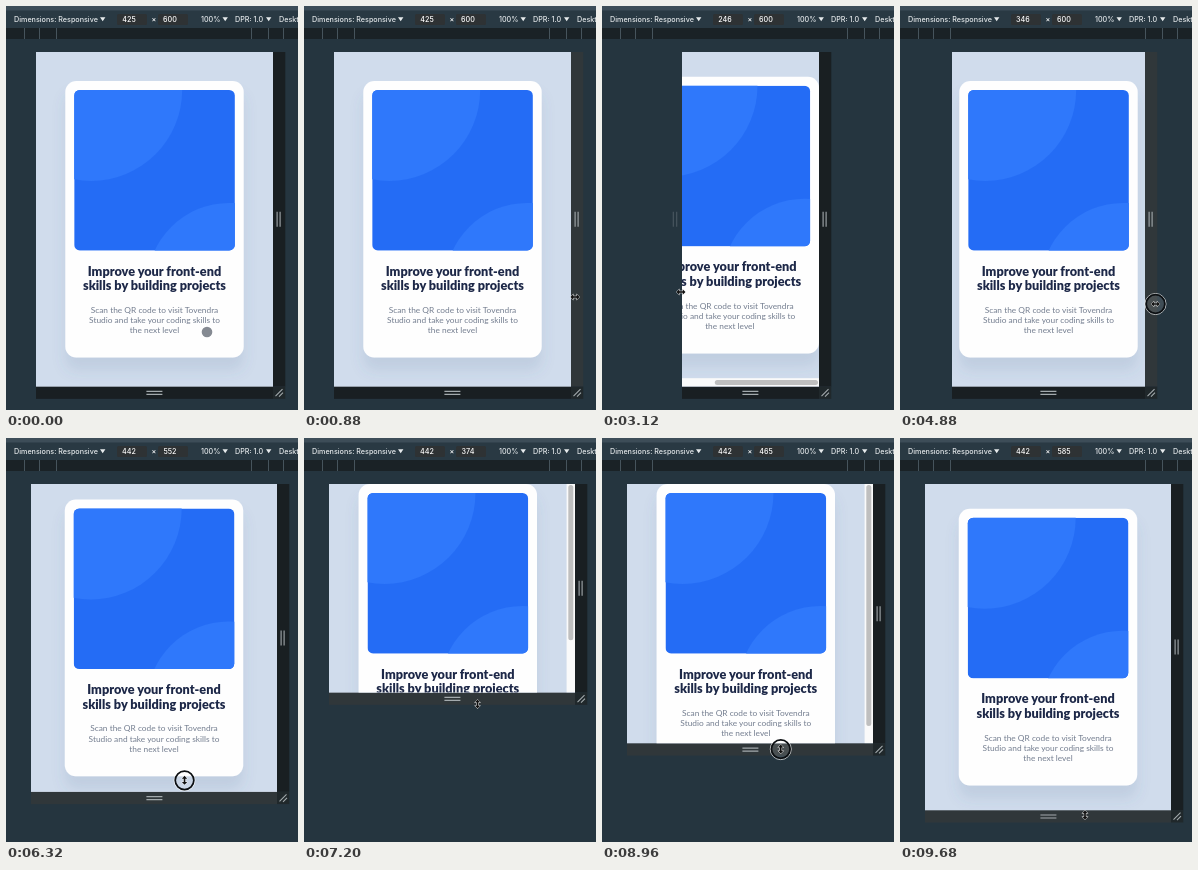
Recreate the animation shown at these times as an HTML page. Size 292 px wide and 404 px high, loop 9.76 s.

```html
<!DOCTYPE html>
<html lang="en">
<head>
<meta charset="utf-8">
<title>Responsive card preview</title>
<style>
  html, body { margin: 0; width: 100%; height: 100%; overflow: hidden; background: #25353f; }
  svg { display: block; }
  .bar { font: 500 7.2px Inter, sans-serif; fill: #e6eaec; }
  .field { text-anchor: middle; fill: #fff; }
  .title { font: 900 12.7px Lato, sans-serif; fill: #1d2848; text-anchor: middle; }
  .body { font: 400 8.35px Lato, sans-serif; fill: #737d8f; text-anchor: middle; }
  .grip { stroke: #a3aaad; stroke-width: 1.1; fill: none; }
  .icon { fill: #111; stroke: #fff; stroke-width: .9; paint-order: stroke; stroke-linejoin: round; }
</style>
</head>
<body>
<svg width="292" height="404" viewBox="0 0 292 404">
  <defs>
    <clipPath id="panel"><rect width="160.6" height="160.6" rx="5.6"/></clipPath>
    <filter id="shade" x="-20%" y="-20%" width="140%" height="140%">
      <feDropShadow dx="0" dy="13" stdDeviation="7" flood-color="#40608c" flood-opacity=".12"/>
    </filter>
  </defs>
  <rect width="292" height="404" fill="#25353f"/>

  <!-- toolbar -->
  <rect width="292" height="22" fill="#293943"/>
  <rect width="292" height="4.5" fill="#3d4d58"/>
  <rect x="111" y="8" width="30" height="11" rx="1.5" fill="#2e3234"/>
  <rect x="152" y="8" width="30" height="11" rx="1.5" fill="#2e3234"/>
  <g class="bar">
    <text x="8" y="15.8">Dimensions: Responsive</text>
    <text id="wText" class="field" x="123" y="15.8">425</text>
    <text class="field" x="148" y="16">×</text>
    <text id="hText" class="field" x="164" y="15.8">600</text>
    <text x="195" y="15.8">100%</text>
    <text x="229" y="15.8">DPR: 1.0</text>
    <text x="273" y="15.8">Desktop</text>
    <path d="M94 11.3h5.4l-2.7 4zM216.5 11.3h5.4l-2.7 4zM260 11.3h5.4l-2.7 4z"/>
  </g>
  <rect y="22" width="292" height="11" fill="#1a2226"/>
  <path d="M18.5 22v11M33.5 22v11M50.5 22v11M245.5 22v11M262.5 22v11M277.5 22v11" stroke="#46545c"/>

  <!-- resize handles -->
  <rect id="rightBar" y="46" width="12.3"/>
  <rect id="bottomBar" height="12.3"/>
  <rect id="corner" width="12.3" height="12.3" fill="#20282b"/>
  <path id="leftGrip" class="grip" d="M-1.7-7.5v15M1.7-7.5v15" opacity=".3"/>
  <path id="rightGrip" class="grip" d="M-1.5-7.5v15M1.5-7.5v15"/>
  <path id="bottomGrip" class="grip" d="M-8-1.5h16M-8 1.5h16"/>
  <path id="cornerGrip" class="grip" d="M2.5 9.5l7-7M6 10l4-4"/>

  <!-- page -->
  <svg id="view" y="46">
    <rect width="100%" height="100%" fill="#faf7fb"/>
    <rect id="sky" width="100%" height="700" fill="#d0dcec"/>
    <g id="card">
      <rect width="178.4" height="276.6" rx="11" fill="#fefefe" filter="url(#shade)"/>
      <g transform="translate(8.9 8.9)" clip-path="url(#panel)">
        <rect width="161" height="161" fill="#246cf5"/>
        <circle cx="17" r="91" fill="#2f78fb"/>
        <circle cx="155" cy="195" r="82" fill="#2f78fb"/>
      </g>
      <g class="title">
        <text x="89.2" y="194.7">Improve your front-end</text>
        <text x="89.2" y="209.2">skills by building projects</text>
      </g>
      <g class="body">
        <text x="89.2" y="231.8">Scan the QR code to visit Tovendra</text>
        <text x="89.2" y="242">Studio and take your coding skills to</text>
        <text x="89.2" y="252.2">the next level</text>
      </g>
    </g>
    <g id="hScroll">
      <rect id="hTrack" width="100%" height="8.4" fill="#fafafa"/>
      <rect id="hThumb" height="5" rx="2.5" fill="#bfbfbf"/>
    </g>
    <g id="vScroll">
      <rect id="vTrack" width="8.4" height="100%" fill="#fafafa"/>
      <rect id="vThumb" width="5" rx="2.5" fill="#bfbfbf"/>
    </g>
  </svg>

  <!-- pointer -->
  <g id="pointer">
    <circle id="dot" r="5.3" fill="#858a92"/>
    <g id="ring" fill="none">
      <circle r="10.5" stroke="#fff" stroke-opacity=".8" stroke-width=".9"/>
      <circle r="9.3" fill="#fff" fill-opacity=".12" stroke="#0c0f12" stroke-width="1.7"/>
    </g>
    <path id="arrow" class="icon" d="M0-4v8l1.9-1.7 1.3 2.9 1.3-.6-1.3-2.8h2.5z"/>
    <path id="resize" class="icon" d="M-4.5 0l2.8-2.7v1.9h3.4v-1.9l2.8 2.7-2.8 2.7v-1.9h-3.4v1.9z"/>
  </g>
</svg>
<script>
const LOOP = 9760, STEP = 80;
const SCALE = 0.5576, MID = 148.4, TOP = 46, BAR = 8.4, STRIP = 12.3;
const CARD_W = 178.4, CARD_H = 276.6;

// pointer gestures in order; "drag" names the axis being resized
const GESTURES = [
  { from: 160, to: 960, x: 273, y: 290 },
  { from: 1120, to: 2240, x: 213, y: 284, drag: 'x' },
  { from: 2480, to: 3040, x: 79, y: 286 },
  { from: 3360, to: 4080, x: 230, y: 297 },
  { from: 4160, to: 5580, x: 280, y: 299, drag: 'x' },
  { from: 5600, to: 6000, x: 181, y: 386 },
  { from: 6160, to: 6560, x: 174, y: 262, drag: 'y' },
  { from: 7120, to: 7440, x: 171, y: 288 },
  { from: 8240, to: 8480, x: 174, y: 261 },
  { from: 8560, to: 9440, x: 185, y: 377, drag: 'y' },
];

const el = {};
document.querySelectorAll('[id]').forEach(n => el[n.id] = n);

// smooth 0..1 between two times
function ramp(t, from, to) {
  const p = Math.min(1, Math.max(0, (t - from) / (to - from)));
  return p * p * (3 - 2 * p);
}
const widthAt = t => Math.round(425 - 179 * ramp(t, 1120, 2240) + 196 * ramp(t, 4160, 5580));
const heightAt = t => Math.round(600 - 226 * ramp(t, 6160, 6700) + 211 * ramp(t, 8560, 9440));
const panAt = t => ramp(t, 2480, 2960) - ramp(t, 3280, 3760);
// scrolls down, flicks back past the top and settles
const scrollAt = t =>
  68 * ramp(t, 7280, 7600) - 73 * ramp(t, 7680, 8000) + 5 * ramp(t, 8000, 8160);

function pointerAt(t) {
  const p = { x: 201, y: 326, drag: null };
  for (const g of GESTURES) {
    const k = ramp(t, g.from, g.to);
    p.x += (g.x - p.x) * k;
    p.y += (g.y - p.y) * k;
    if (g.drag && t >= g.from && t <= g.to) p.drag = g.drag;
  }
  return p;
}

const show = (node, on) => node.setAttribute('display', on ? 'inline' : 'none');
const move = (node, x, y) => node.setAttribute('transform', `translate(${x} ${y})`);
function set(node, attrs) {
  for (const key in attrs) node.setAttribute(key, attrs[key]);
}
const barFill = lit => lit ? '#30373a' : '#191f22';

function drawPage(t, w, h) {
  const overX = w < CARD_W, overY = h < CARD_H;
  const innerW = w - (overY ? BAR : 0), innerH = h - (overX ? BAR : 0);
  const panX = overX ? panAt(t) * (CARD_W - innerW) : 0;
  const panY = overY ? Math.min(scrollAt(t), CARD_H - innerH) : 0;

  set(el.sky, { y: Math.max(0, -panY) });
  move(el.card, overX ? -panX : (innerW - CARD_W) / 2,
    overY ? -panY : (innerH - CARD_H) / 2);

  const kx = innerW / CARD_W, ky = innerH / CARD_H;
  show(el.hScroll, overX);
  if (overX) {
    set(el.hTrack, { y: innerH });
    set(el.hThumb, { x: 1 + panX * kx, y: innerH + 1.9, width: innerW * kx - 2 });
  }
  show(el.vScroll, overY);
  if (overY) {
    set(el.vTrack, { x: innerW });
    set(el.vThumb, { x: innerW + 1.7, y: 1 + Math.max(0, panY) * ky, height: innerH * ky - 2 });
  }
}

function drawHandles(left, right, bottom, hover) {
  const midY = (TOP + bottom) / 2, h = bottom - TOP;
  show(el.leftGrip, hover.left);
  set(el.rightBar, { x: right, height: h, fill: barFill(hover.right) });
  set(el.bottomBar, { x: left, y: bottom, width: right - left, fill: barFill(hover.bottom) });
  set(el.corner, { x: right, y: bottom });
  move(el.leftGrip, left - 7, midY);
  move(el.rightGrip, right + 5.6, midY);
  move(el.bottomGrip, MID, bottom + 6.3);
  move(el.cornerGrip, right, bottom);
}

function drawPointer(t, p, hover) {
  const sideways = p.drag === 'x' || hover.left || hover.right;
  const resizing = sideways || hover.bottom;
  const clicked = t < 160;
  move(el.pointer, p.x, p.y);
  show(el.dot, clicked);
  show(el.ring, p.drag);
  show(el.arrow, !clicked && !resizing);
  show(el.resize, resizing);
  set(el.resize, { transform: sideways ? '' : 'rotate(90)' });
}

function draw(t) {
  const cssW = widthAt(t), cssH = heightAt(t);
  const w = Math.round(cssW * SCALE), h = cssH * SCALE;
  const left = Math.round(MID - cssW * SCALE / 2);
  const right = left + w, bottom = TOP + h;
  const p = pointerAt(t);
  const onStrip = d => d >= 0 && d < STRIP;
  const hover = {
    left: onStrip(left - p.x),
    right: p.y < bottom && onStrip(p.x - right),
    bottom: p.drag === 'y' || (p.x < right && onStrip(p.y - bottom)),
  };

  el.wText.textContent = cssW;
  el.hText.textContent = cssH;
  set(el.view, { x: left, width: w, height: h });
  drawPage(t, w, h);
  drawHandles(left, right, bottom, hover);
  drawPointer(t, p, hover);
}

const start = performance.now();
function tick() {
  const t = (performance.now() - start) % LOOP;
  draw(Math.floor(t / STEP) * STEP);
  requestAnimationFrame(tick);
}
tick();
</script>
</body>
</html>
```
